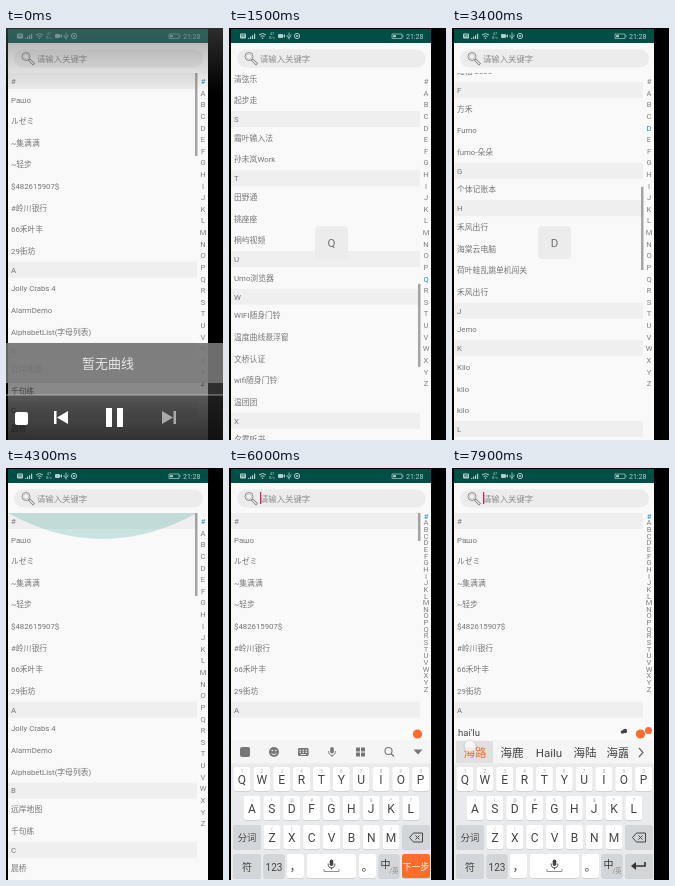
Write an HTML page with a canvas that moves like this. It is 217 by 412 pixels and loops after 8 s.

```html
<!DOCTYPE html>
<html lang="zh-CN">
<head>
<meta charset="utf-8">
<title>字母列表</title>
<style>
html, body { margin: 0; width: 100%; height: 100%; overflow: hidden; background: #000; }
canvas { display: block; }
</style>
</head>
<body>
<canvas id="stage" width="217" height="412"></canvas>
<script>
const ctx = document.getElementById('stage').getContext('2d');
const FONT = 'Roboto, "Noto Sans CJK SC", "Noto Sans CJK", sans-serif';
const LOOP = 8000, TOP = 45, HEAD = 16, ROW = 21.6;
const BLUE = '#1e88d2', ORANGE = '#ff6c2c';

const sections = `#:Рашо,ルゼミ,~集满满,~轻步,$482615907$,#岭川银行,66禾叶丰,29街坊
A:Jolly Crabs 4,AlarmDemo,AlphabetList(字母列表)
B:远岸地图,千句练
C:晨桥,测试程序,橙子笔记,窗边
D:灯塔,单词表,短租 2000
F:方禾,Fumo,fumo-朵朵
G:个体记账本
H:禾风出行,海棠云电脑,荷叶蛙乱跳单机闯关,禾风出行
J:Jemo
K:Kilo,kilo,kilo
L:蓝牙测试,录音机
Q:清弦乐,起步走
S:霜叶输入法,孙未岚Work
T:田野通,挑座座,桐屿视频
U:Umo浏览器
W:WIFI随身门铃,温度曲线悬浮窗,文桥认证,wifi随身门铃,温团团
X:夕雾听书,行不行炼丹
Y:云杉视频,原野银行
Z:浏览器,啵噜啵噜,祝言舟,啵噜啵噜动画,掌钱匣,泽原垦荒银行,逐页书架,重庆,指间日常,亳州`;

// Lay the list out once: every row knows its letter, top and height.
const rows = [];
let total = 0;
for (const line of sections.split('\n')) {
  const letter = line[0];
  [letter, ...line.slice(2).split(',')].forEach((label, i) => {
    const h = i ? ROW : HEAD;
    rows.push({ letter, label, head: !i, y: total, h });
    total += h;
  });
}

const scrollKeys = [[700, 0], [900, 190], [1200, 600], [1500, 931], [1900, 1130], [2300, 1240], [2500, 1253],
  [2700, 1253], [3000, 1010], [3400, 504], [3700, 230], [4100, 0]];
const typing = [[6600, 'H'], [6800, 'A'], [7000, 'I'], [7200, 'L'], [7400, 'U']];
const composed = ['', 'h', 'ha', 'hai', "hai'l", "hai'lu"];
const candidates = ['', '和 好 会 还 后', '哈 蛤 Ha 铪 虾', '还 海 Hai 害 孩', '海龙 海蓝 海里 海绿 还来', '海路 海鹿 Hailu 海陆 海露'];

const clamp = v => Math.max(0, Math.min(1, v));
const ramp = (t, a, b) => clamp((t - a) / (b - a));

function track(keys, t) {
  let [t0, v0] = keys[0];
  for (const [t1, v1] of keys) {
    if (t < t1) return t1 === t0 ? v0 : v0 + (v1 - v0) * ramp(t, t0, t1);
    [t0, v0] = [t1, v1];
  }
  return v0;
}

function rect(x, y, w, h, color, r = 0) {
  ctx.fillStyle = color;
  ctx.beginPath();
  ctx.roundRect(x, y, w, h, r);
  ctx.fill();
}

function text(s, x, y, size, color, align = 'left') {
  ctx.font = `${size}px ${FONT}`;
  ctx.textAlign = align;
  ctx.textBaseline = 'alphabetic';
  ctx.fillStyle = color;
  ctx.fillText(s, x, y + size * 0.36);
}

function dot(x, y, r, color) {
  ctx.fillStyle = color;
  ctx.beginPath();
  ctx.arc(x, y, r, 0, 7);
  ctx.fill();
}

function stroke(d, color, width = 1) {
  ctx.strokeStyle = color;
  ctx.lineWidth = width;
  ctx.stroke(new Path2D(d));
}

function shape(d, color) {
  ctx.fillStyle = color;
  ctx.fill(new Path2D(d));
}

function circlePath(x, y, r) {
  return `M${x - r} ${y}a${r} ${r} 0 1 0 ${2 * r} 0a${r} ${r} 0 1 0 ${-2 * r} 0`;
}

function statusBar() {
  const ink = '#b4cdc8';
  rect(2, 1, 200, 14, '#004f46');
  rect(11, 5.5, 6, 5, ink, 1);
  text('HD', 14, 8, 3.4, '#004f46', 'center');
  for (let i = 0; i < 4; i++) rect(19 + i * 2, 10 - i * 1.4, 1.2, 1 + i * 1.4, ink);
  stroke('M30 7q3.5-3 7 0M31.5 8.7q2-1.8 4 0', ink);
  dot(33.5, 10.3, .8, ink);
  text('47', 43, 6, 4, ink, 'center');
  text('B/s', 43, 10, 3.5, ink, 'center');
  rect(49, 6, 5, 4, ink, 1);
  shape('M54 8l2-2v4z', ink);
  stroke('M60 4.5v7M58 7v1.5l2 1.5l2-2v-1.5', ink, .8);
  stroke(circlePath(68, 8, 2.6), ink);
  dot(68, 8, 1, ink);
  stroke('M163 6h10v4.5h-10zM174 7.2v2', ink, .7);
  rect(164, 7.2, 3, 2, ink);
  text('21:28', 177, 8.2, 7, ink);
}

function searchBar(t) {
  rect(2, 15, 200, 30, '#f9f9f9');
  rect(8, 21.5, 189, 18, '#ececec', 9);
  stroke('M23 31.5l5 5', '#777', 2.8);
  stroke('M23.5 32l4 4', '#f2f2f2', 1.3);
  dot(20, 28.5, 4, '#f2f2f2');
  stroke(circlePath(20, 28.5, 4), '#777', .8);
  stroke(circlePath(20, 28.5, 2.5), '#aaa', .5);
  text('请输入关键字', 31, 30.5, 8.4, '#8c8c8c');
  if (t >= 5600 && Math.floor((t - 5600) / 500) % 2 === 0) rect(31, 24, 1.2, 12, '#d81b60');
}

function list(t, scroll, bottom) {
  ctx.save();
  ctx.beginPath();
  ctx.rect(2, TOP, 200, bottom - TOP);
  ctx.clip();
  rect(2, TOP, 200, bottom - TOP, '#f9f9f9');
  for (const row of rows) {
    const y = TOP + row.y - scroll;
    if (y + row.h < TOP || y > bottom) continue;
    if (row.head) rect(2, y, 189, row.h, '#efefef');
    text(row.label, 5, y + row.h / 2, 7.8, '#757575');
  }
  const glow = 26 * ramp(t, 4050, 4280) * (1 - ramp(t, 4330, 4650));
  if (glow) shape(`M2 45Q96.5 ${45 + 2 * glow} 191 45z`, 'rgba(0,133,119,.19)');

  const fade = t < 5600 ? 1 - ramp(t, 4800, 5150) : ramp(t, 5600, 5800) * (1 - ramp(t, 6200, 6500));
  const view = bottom - TOP;
  rect(189, TOP + scroll / total * view, 2.5, view * view / total, `rgba(120,120,120,${.65 * fade})`);
  ctx.restore();
}

function index(current, compact) {
  [...'#ABCDEFGHIJKLMNOPQRSTUVWXYZ'].forEach((c, i) => {
    const y = compact ? 48 + i * 6.65 : 53.3 + i * 11.62;
    text(c, 197, y, 7.6, c === current ? BLUE : '#808080', 'center');
  });
}

function key(label, x, y, w, { hint, bg = '#fff', ink = '#444', size = 12 } = {}) {
  rect(x, y + .8, w, 24, '#c8cbce', 2.5);
  rect(x, y, w, 24, bg, 2.5);
  if (hint) text(hint, x + w / 2, y + 4, 4.5, '#aaa', 'center');
  text(label, x + w / 2, y + 13, size, ink, 'center');
}

function mic(x, y, s, color) {
  rect(x - 1.8 * s, y - 5 * s, 3.6 * s, 6.5 * s, color, 1.8 * s);
  stroke(`M${x - 3.4 * s} ${y - s}q0 ${4.4 * s} ${3.4 * s} ${4.4 * s}t${3.4 * s} ${-4.4 * s}M${x} ${y + 3 * s}v${2 * s}`, color, .9);
}

function toolbar() {
  const ink = '#777';
  rect(11, 279, 10, 10, ink, 2);
  dot(45, 284, 5, ink);
  dot(43.2, 282.5, .8, '#fff');
  dot(46.8, 282.5, .8, '#fff');
  stroke('M42.5 285.5q2.5 2.5 5 0', '#fff', .8);
  rect(69, 280, 10.5, 8, ink, 1);
  for (let i = 0; i < 6; i++) rect(70.5 + i % 3 * 3, 281.7 + (i > 2) * 2, 1.5, 1, '#fff');
  rect(71.5, 286, 5.5, .8, '#fff');
  mic(103, 284, 1, ink);
  for (let i = 0; i < 4; i++) rect(127 + i % 2 * 5, 279.5 + (i > 1) * 5, 4, 4, ink);
  stroke(circlePath(159.5, 283, 3.5), ink, 1.1);
  stroke('M162 285.5l3 3', ink, 1.2);
  shape('M184.5 281.5h9l-4.5 5z', ink);
}

function candidateBar(count, pressed) {
  if (pressed) rect(4, 273, 37, 22, '#e0e0e0');
  text(composed[count], 6, 265, 9.5, '#444');
  candidates[count].split(' ').forEach((word, i) => {
    text(word, [23, 60, 97, 133, 166][i], 284.5, 11.5, i ? '#444' : ORANGE, 'center');
  });
  rect(176, 273, 26, 22, '#f5f5f5');
  stroke('M187 280l4 4.5l-4 4.5', '#666', 1.2);
  dot(170.5, 264, 1.8, '#444');
  dot(173, 263, 2.2, '#444');
  dot(196.5, 262.5, 3.5, ORANGE);
}

function keyboard(t) {
  const up = ramp(t, 5580, 5900);
  if (!up) return;
  const count = typing.filter(([at]) => t >= at).length;
  const pressed = typing.find(([at]) => t >= at && t < at + 130);
  const touching = t > 7700;
  const grey = '#d3d6d9';
  const letters = (chars, hints, x, y) => [...chars].forEach((c, i) => {
    const bg = pressed && pressed[1] === c ? '#c9cccf' : '#fff';
    key(c, x + i * 19.85, y, 17, { hint: hints[i], bg });
  });

  ctx.save();
  ctx.beginPath();
  ctx.rect(2, 0, 200, 412);
  ctx.clip();
  ctx.translate(0, 154 * (1 - up) ** 2);
  rect(2, 258, 200, 14, '#fafafa');
  rect(2, 272, 200, 24, '#f5f5f5');
  rect(2, 295.5, 200, 117, '#e8eaec');
  dot(188.5, 266, 4.6, ORANGE);
  if (count) candidateBar(count, touching); else toolbar();

  letters('QWERTYUIOP', '1234567890', 4.5, 299);
  letters('ASDFGHJKL', "~!@#%'&*?", 14.5, 328);
  letters('ZXCVBNM', '()-_:;/', 34.5, 357);
  key('分词', 4, 357, 28, { bg: grey, size: 9.3 });
  key('', 173, 357, 28, { bg: grey });
  stroke('M180.5 369.5l4-4.5h9v9h-9zM186.5 367.5l4 4M190.5 367.5l-4 4', '#444', 1);
  key('符', 4, 386, 28, { bg: grey, size: 10 });
  key('123', 34.5, 386, 21, { bg: grey, size: 10 });
  key('，', 58, 386, 17);
  key('', 78, 386, 49);
  mic(102.5, 396.5, 1, '#444');
  stroke('M95 401v2.5h15v-2.5', '#777', .8);
  key('。', 130, 386, 17);
  key('', 149.5, 386, 21, { bg: grey });
  text('中', 156.5, 396, 10, '#333', 'center');
  text('/英', 165, 403, 6.5, '#888', 'center');
  if (count) {
    key('', 173, 386, 28, { bg: grey });
    stroke('M193 394v4h-11', '#333', 1.6);
    shape('M184 394v8l-5-4z', '#333');
  } else {
    key('下一步', 173, 386, 28, { bg: ORANGE, ink: '#fff', size: 8.8 });
  }
  if (touching) {
    dot(18, 278, 6, 'rgba(255,255,255,.75)');
    stroke(circlePath(18, 278, 6), 'rgba(150,150,150,.5)', .7);
  }
  ctx.restore();
}

function shade(y0, y1, tone, a0, a1) {
  const g = ctx.createLinearGradient(0, y0, 0, y1);
  g.addColorStop(0, `rgba(${tone},${tone},${tone},${a0})`);
  g.addColorStop(1, `rgba(${tone},${tone},${tone},${a1})`);
  ctx.fillStyle = g;
  ctx.fillRect(0, y0, 217, y1 - y0);
}

function player(alpha) {
  if (!alpha) return;
  ctx.save();
  ctx.globalAlpha = alpha;
  rect(2, 1, 200, 14, 'rgba(50,150,130,.25)');
  rect(202, 315, 15, 97, '#555');
  shade(0, 65, 90, .5, 0);
  shade(315, 367, 0, .45, .45);
  shade(367, 412, 0, .65, .8);
  rect(0, 315, 217, 40, 'rgba(125,125,125,.8)');
  text('暂无曲线', 102, 335, 13, '#e6e6e6', 'center');
  rect(0, 366.5, 217, 1, 'rgba(220,220,220,.6)');
  rect(9, 384, 13, 13, '#fff', 2);
  rect(48, 383, 2.5, 13, '#fff');
  shape('M62 383v13l-11-6.5z', '#fff');
  rect(100, 380, 6, 19, '#fff');
  rect(111, 380, 6, 19, '#fff');
  shape('M156 383v13l11-6.5z', '#aaa');
  rect(167.5, 383, 2.5, 13, '#aaa');
  ctx.restore();
}

function draw(t) {
  const scroll = track(scrollKeys, t);
  const current = rows.find(r => r.y + r.h > scroll + .5).letter;
  const compact = t >= 5800;

  rect(0, 0, 217, 412, '#000');
  statusBar();
  searchBar(t);
  list(t, scroll, compact ? 258 : 412);
  index(current, compact);
  if ((t > 750 && t < 2400) || (t > 2800 && t < 4150)) {
    rect(86, 198, 33, 33, 'rgba(236,236,236,.92)', 4);
    text(current, 102.5, 215, 11.5, '#707070', 'center');
  }
  keyboard(t);
  player(1 - ramp(t, 580, 800));
}

const start = performance.now();
function frame() {
  draw((performance.now() - start) % LOOP);
  requestAnimationFrame(frame);
}
frame();
</script>
</body>
</html>
```
